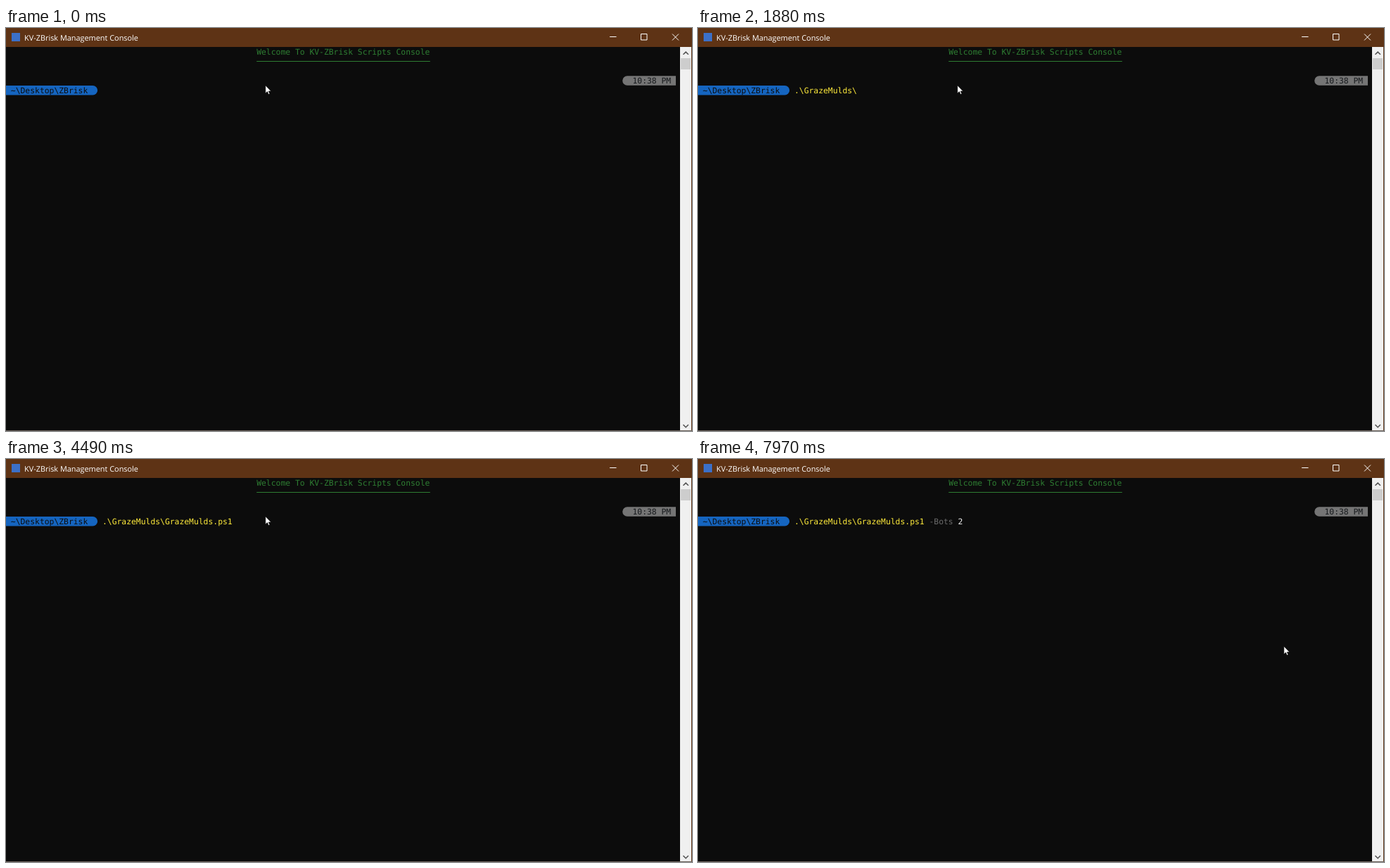
These frames come from a looping animation (975 px wide and 574 px high, 8000 ms). An HTML page:

```html
<!DOCTYPE html>
<html lang="en">
<head>
<meta charset="utf-8">
<title>Console</title>
<style>
  html, body { margin: 0; width: 100%; height: 100%; overflow: hidden; background: #0c0c0c; }
  svg { display: block; width: 975px; height: 574px; }
  text { white-space: pre; text-rendering: geometricPrecision; }
  .mono { font: 11.378px "DejaVu Sans Mono", monospace; }
  .title { font: 10.9px "Open Sans", sans-serif; fill: #fff; }
  .line { fill: none; stroke: #fff; }
  .chevron { fill: none; stroke: #505050; stroke-width: 1.5; }
</style>
</head>
<body>
<svg viewBox="0 0 975 574">
  <rect width="975" height="574" fill="#0c0c0c"/>

  <rect width="975" height="27" fill="#5e3315"/>
  <rect x="8" y="7" width="12" height="12" fill="#3c70c8"/>
  <text class="title" x="26" y="17.5">KV-ZBrisk Management Console</text>
  <path class="line" d="M858 12.5h9.5M902.5 8.5h8.5v8.5h-8.5zM947 8.5l9 9M956 8.5l-9 9"/>

  <rect x="958" y="27" width="16" height="546" fill="#f0f0f0"/>
  <rect x="959" y="43" width="14" height="16" fill="#cdcdcd"/>
  <path class="chevron" d="M962.5 37.8l3.7-3.7 3.7 3.7M962.5 565l3.7 3.7 3.7-3.7"/>
  <rect x="974" y="27" width="1" height="547" fill="#5e3315"/>
  <rect y="573" width="975" height="1" fill="#6b625b"/>

  <g class="mono">
    <text x="356.2" y="38.1" fill="#2e7d32">Welcome To KV-ZBrisk Scripts Console</text>
    <rect x="356.2" y="47" width="246.6" height="1" fill="#2e7d32"/>
    <path d="M952 68.2H883a6.8 6.8 0 0 0 0 13.6H952z" fill="#757575"/>
    <text x="890.5" y="79.1" fill="#16191c">10:38 PM</text>
    <path d="M0 82H123.3a6.8 6.8 0 0 1 0 13.6H0z" fill="#1565c0"/>
    <text x="6.85" y="92.8" fill="#0c0c0c">~\Desktop\ZBrisk</text>
    <text x="137" y="92.8"><tspan id="command" fill="#ffeb3b"></tspan><tspan id="option" fill="#6c6c6c"></tspan><tspan id="value" fill="#f2f2f2"></tspan></text>
  </g>
  <rect id="caret" y="92" width="6.85" height="3.7" fill="#f2f2f2"/>
  <path id="pointer" d="M0 0V11.2L2.6 8.8 4.3 12.8 6.1 12 4.4 8.2H7.9z" fill="#fff" stroke="#000" stroke-width=".6"/>
</svg>
<script>
  const DURATION = 8000, CELL = 6.85, PROMPT_END = 137;
  const folder = '.\\GrazeMulds\\';
  const script = folder + 'GrazeMulds.ps1';

  // Start time, typed line, caret visible
  const typing = [
    [0, '', false],
    [250, '', true],
    [780, 'g', false],
    [930, 'gr', true],
    [1050, 'graz', true],
    [1200, 'graze', true],
    [1320, 'graze', false],
    [1600, folder, true],
    [1880, folder, false],
    [2440, folder + 'g', true],
    [2560, folder + 'gra', true],
    [2710, folder + 'graz', true],
    [2860, folder + 'graz', false],
    [3010, script, true],
    [3410, script, false],
    [3970, script, true],
    [4370, script + ' ', true],
    [4490, script + ' ', false],
    [5080, script + ' -', true],
    [5330, script + ' -b', true],
    [5480, script + ' -b', false],
    [5760, script + ' -bo', true],
    [5880, script + ' -bot', true],
    [6000, script + ' -Bots', true],
    [6120, script + ' -Bots ', true],
    [6400, script + ' -Bots ', false],
    [6550, script + ' -Bots 2', false],
    [7110, script + ' -Bots 2', true],
    [7580, script + ' -Bots 2', false]
  ];

  // Start time, x, y
  const pointing = [[0, 368.8, 81.8], [7850, 601, 174], [7970, 832.8, 266.8]];

  const byId = id => document.getElementById(id);
  const parts = ['command', 'option', 'value'].map(byId);
  const caret = byId('caret'), pointer = byId('pointer');
  const current = (steps, time) => steps.findLast(step => step[0] <= time);

  let shown;
  function showTyping(step) {
    if (step === shown) return;
    shown = step;
    const [, line, caretOn] = step;
    const pieces = line.match(/^(\S*)( ?-?[a-z]* ?)(\d?)$/i).slice(1);
    parts.forEach((part, i) => part.textContent = pieces[i]);
    caret.setAttribute('x', PROMPT_END + line.length * CELL);
    caret.setAttribute('visibility', caretOn ? 'visible' : 'hidden');
  }

  const start = performance.now();
  function draw() {
    const time = (performance.now() - start) % DURATION;
    showTyping(current(typing, time));
    const [, x, y] = current(pointing, time);
    pointer.setAttribute('transform', `translate(${x} ${y})`);
    requestAnimationFrame(draw);
  }
  draw();
</script>
</body>
</html>
```
